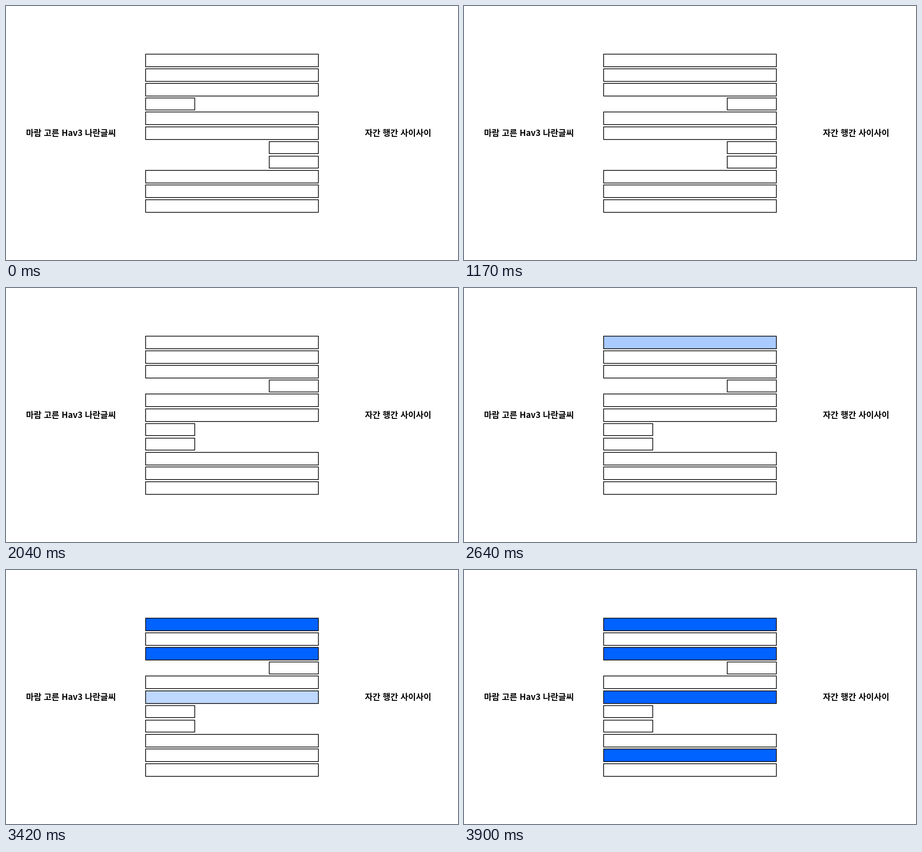
Animation of 998x561 px, one loop 4800 ms. Source, as an HTML page:

```html
<!DOCTYPE html>
<html lang="ko">
<head>
<meta charset="utf-8">
<title>Bars</title>
<style>
  html, body { margin: 0; width: 100%; height: 100%; overflow: hidden; background: #fff; }
  svg { display: block; width: 100%; height: 100%; }
  rect { fill: #fff; stroke: #000; stroke-width: 1.6; }
  text { font: 700 18.5px "Noto Sans CJK KR", "Noto Sans KR", "Noto Sans CJK", sans-serif; }
</style>
</head>
<body>
<svg viewBox="0 0 998 561">
  <g id="bars"></g>
  <text x="44.2" y="287">마람 고른 Hav3 나란글씨</text>
  <text x="792.6" y="287">자간 행간 사이사이</text>
</svg>
<script>
  const LOOP = 4800, STEP = 30;
  const LEFT = 308.3, RIGHT = 581.3;
  const BLUE = [0, 98, 255];
  const group = document.getElementById('bars');

  function addBar(x, y, width, height) {
    const bar = document.createElementNS('http://www.w3.org/2000/svg', 'rect');
    Object.entries({ x, y, width, height }).forEach(([k, v]) => bar.setAttribute(k, v));
    return group.appendChild(bar);
  }

  const wide = [106.4, 138.7, 171, 234.1, 267, 363.1, 395.3, 427.9]
    .map(y => addBar(LEFT, y, 381.4, 27.8));
  const small = [203.2, 299.5, 331.6].map(y => addBar(LEFT, y, 108.4, 26.4));

  // The run speeds up; the recoil and settling are soft.
  const run = power => s => s ** power;
  const soft = s => s * s * (3 - 2 * s);

  // Keys are [time, x, easing towards x].
  const toRight = [
    [420, LEFT], [900, RIGHT + 14, run(1.27)],
    [990, RIGHT - 12, soft], [1170, RIGHT, soft]
  ];
  const toLeft = [
    [1290, RIGHT], [1860, LEFT - 12, run(1.44)],
    [1950, LEFT + 14, soft], [2040, LEFT, soft]
  ];

  // Bar index, first step, number of steps.
  const fills = [[0, 2640, 3], [2, 3060, 3], [4, 3420, 4], [6, 3840, 3]];

  function valueAt(keys, t) {
    const i = keys.findIndex(key => t < key[0]);
    if (i === 0) return keys[0][1];
    if (i < 0) return keys[keys.length - 1][1];
    const [t0, x0] = keys[i - 1], [t1, x1, ease] = keys[i];
    return x0 + (x1 - x0) * ease((t - t0) / (t1 - t0));
  }

  function tint(amount) {
    return `rgb(${BLUE.map(c => Math.round(255 + (c - 255) * amount))})`;
  }

  function draw(now) {
    const t = Math.floor((now % LOOP) / STEP + 1e-6) * STEP;
    small[0].setAttribute('x', valueAt(toRight, t));
    small.slice(1).forEach(bar => bar.setAttribute('x', valueAt(toLeft, t)));
    for (const [index, start, count] of fills) {
      const done = (t - start) / STEP + 1;
      wide[index].style.fill = tint(Math.min(1, Math.max(0, done / count)));
    }
  }

  const begin = performance.now();
  function tick() {
    draw(performance.now() - begin);
    requestAnimationFrame(tick);
  }
  tick();
</script>
</body>
</html>
```
